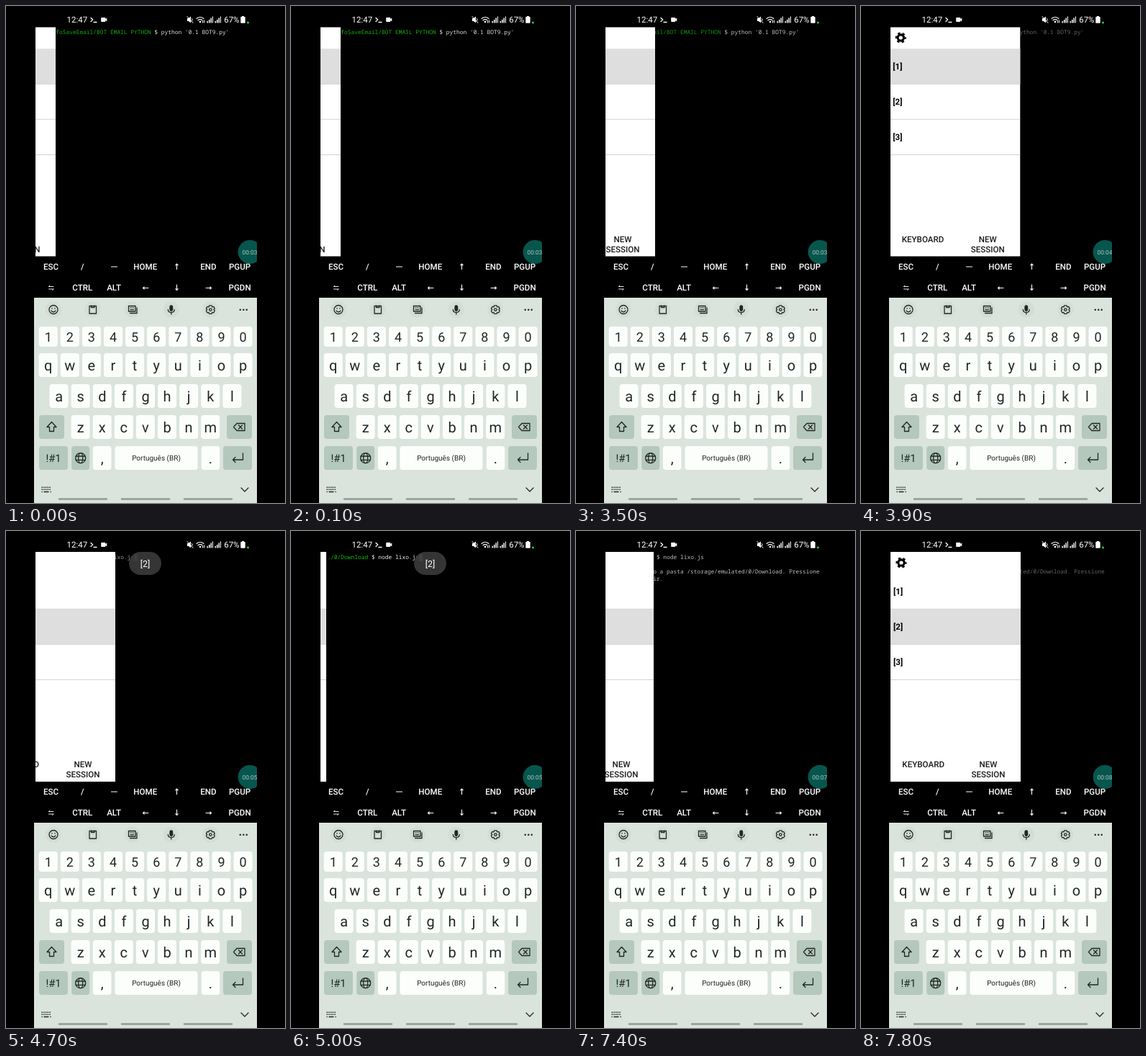
These frames come from a looping animation (388x690 px, 8 s). An HTML page:

```html
<!DOCTYPE html>
<html lang="pt-BR">
<head>
<meta charset="utf-8">
<title>Terminal sessions</title>
<style>
html, body { margin: 0; width: 100%; height: 100%; overflow: hidden; background: #000; }
svg { display: block; width: 388px; height: 690px; font-family: Roboto, sans-serif; text-rendering: geometricPrecision; }
.mid { text-anchor: middle; }
.mono { font: 7.88px "Noto Sans Mono", "DejaVu Sans Mono", monospace; fill: #f4f4f4; }
.dir { fill: #12c312; }
.line { fill: none; stroke: currentColor; stroke-width: 1.3; stroke-linecap: round; stroke-linejoin: round; }
.white { color: #fff; fill: #fff; }
.ink { color: #202724; }

/* One clock for every part; the small lead keeps steps ahead of rounding. */
.anim { animation: 8s step-end -10ms infinite; }
#term { animation-name: slide; }
#drawer { transform: translateX(calc(var(--x) * 1px)); }
#scrim { opacity: calc((181 + var(--x)) / 181 * .6); }
#first { animation-name: first; }
#second { animation-name: second; }
#output { animation-name: output; }
#cursor { animation-name: cursor; }
#current { animation-name: current; }
#toast { animation-name: toast; }
#enter { animation-name: press; }
#timer { animation-name: tick; }

@keyframes slide {
  0% { --x: -153; }
  43.75% { --x: -112; } 45% { --x: -66; } 46.25% { --x: -31; } 47.5% { --x: -9; }
  48.75% { --x: -.7; } 51.25% { --x: 0; }
  57.5% { --x: -23; } 58.75% { --x: -70; } 60% { --x: -119; } 61.25% { --x: -153; }
  62.5% { --x: -173; } 63.75% { --x: -180; } 65% { --x: -181; }
  92.5% { --x: -114; } 93.75% { --x: -66; } 95% { --x: -31; } 96.25% { --x: -9; }
  97.5%, 100% { --x: 0; }
}
@keyframes first { 0% { visibility: visible; } 56.25%, 100% { visibility: hidden; } }
@keyframes second { 0% { visibility: hidden; } 56.25%, 100% { visibility: visible; } }
@keyframes output { 0% { opacity: 0; } 77.5%, 100% { opacity: 1; } }
@keyframes cursor {
  0% { transform: translate(137.3px, -10px); }
  75% { transform: none; }
  77.5%, 100% { transform: translateY(30px); }
}
@keyframes current { 0% { transform: none; } 56.25%, 100% { transform: translateY(49px); } }
@keyframes toast { 0% { opacity: 0; } 57.5% { opacity: .6; } 58.75% { opacity: 1; } 83.75%, 100% { opacity: 0; } }
@keyframes press { 0% { fill: #b5c8bd; } 75% { fill: #91ae9f; } 77.5%, 100% { fill: #b5c8bd; } }
@keyframes tick {
  0% { transform: none; }
  46.25% { transform: translateY(-40px); }
  57.5% { transform: translateY(-80px); }
  75% { transform: translateY(-120px); }
  92.5% { transform: translateY(-160px); }
  97.5%, 100% { transform: translateY(-200px); }
}
</style>
</head>
<body>
<svg viewBox="0 0 388 690">
  <defs>
    <clipPath id="view"><path d="M41 29.5H349V347.5H41Z"/></clipPath>
    <clipPath id="badge"><path d="M349 328.3A16.5 16.5 0 1 0 349 354.7Z"/></clipPath>
  </defs>
  <rect width="388" height="690"/>

  <!-- Status bar -->
  <g class="white" font-size="11.5">
    <text x="84.6" y="23">12:47</text>
    <path class="line" stroke-width="1.2" d="M118 16.5L120.7 19L118 21.5M122 22.5H126"/>
    <path d="M133 16H137.5Q138.3 16 138.3 16.8V18L140.3 16.5V21.5L138.3 20V21.2Q138.3 22 137.5 22H133Q132.200 22 132.200 21.200V16.800Q132.200 16 133 16Z"/>
    <path d="M252 17H254L257 14.500V23.500L254 21H252Z"/>
    <path class="line" style="stroke-width:1" d="M252 14.500L260 23.500M258.500 17.500Q260 19 258.800 20.500"/>
    <g class="line" style="stroke-width:1.2">
      <path d="M265 17.500Q270 13.500 275 17.500M267 19.800Q270 17.300 273 19.800"/>
    </g>
    <circle cx="270" cy="22" r="1.300"/>
    <path d="M273 20.500H274V23.500H273ZM275 19.500H276V23.500H275Z"/>
    <path id="bars" d="M279.500 21H281V23.500H279.500ZM282 19H283.500V23.500H282ZM284.500 16.500H286V23.500H284.500ZM287 14.500H288V23.500H287Z"/>
    <use href="#bars" x="11"/>
    <text x="303.200" y="23">67%</text>
    <path d="M328 14H331V15H332Q332.700 15 332.700 15.700V23Q332.700 23.700 332 23.700H327Q326.300 23.700 326.300 23V15.700Q326.300 15 327 15H328Z"/>
    <circle cx="336.500" cy="23" r="1.500" fill="#16d84a"/>
  </g>

  <!-- Terminal and drawer -->
  <g id="term" class="anim" clip-path="url(#view)">
    <g id="first" class="anim mono">
      <text x="41" y="38.800"><tspan class="dir">.../InfoSaveEmail/BOT EMAIL PYTHON</tspan> $ python '0.1 BOT9.py'</text>
      <rect x="41" y="42" width="4.700" height="10"/>
    </g>
    <g id="second" class="anim mono">
      <text x="41" y="38.800"><tspan class="dir">.../0/Download</tspan> $ node lixo.js</text>
      <g id="output" class="anim">
        <text x="41" y="58.800">Bot monitorando a pasta /storage/emulated/0/Download. Pressione</text>
        <text x="41" y="68.800">Ctrl+C para sair.</text>
      </g>
      <rect id="cursor" class="anim" x="41" y="42" width="4.700" height="10"/>
    </g>
    <rect id="scrim" x="41" y="29" width="308" height="319"/>
    <g id="drawer" fill="#1c1c1c">
      <rect x="41" y="29" width="181" height="319" fill="#fff"/>
      <rect id="current" class="anim" x="41" y="59.300" width="181" height="49.200" fill="#dedede"/>
      <path d="M41 108.300H222M41 157.300H222M41 206.500H222" stroke="#d4d4d4"/>
      <g id="gear" fill="none" stroke="#000">
        <circle cx="56" cy="44" r="4.200" stroke-width="3.200"/>
        <circle cx="56" cy="44" r="6.300" stroke-width="2.600" stroke-dasharray="3.300 3.297" stroke-dashoffset="1.650"/>
      </g>
      <g id="rows" font-size="11.600" font-weight="700" fill="#000"></g>
      <g class="mid" font-size="11.600" font-weight="500">
        <text x="86.700" y="328">KEYBOARD</text>
        <text x="177" y="328">NEW</text>
        <text x="177" y="342">SESSION</text>
      </g>
    </g>
  </g>

  <g id="toast" class="anim">
    <rect x="171" y="29" width="45" height="32" rx="16" fill="#393939" fill-opacity=".94"/>
    <text class="mid" x="193.500" y="49.500" font-size="12.500" fill="#fff">[2]</text>
  </g>

  <g clip-path="url(#badge)">
    <rect x="320" y="324" width="29" height="36" fill="#07564e"/>
    <g id="timer" class="anim mid" font-size="8.400" fill="#adc3c0"></g>
  </g>

  <!-- Extra keys -->
  <g id="extra" class="white mid" font-size="11.600" font-weight="500"></g>
  <g class="white line" style="fill:none;stroke-width:1.100">
    <path d="M146.500 362H154.500M237.500 365.500V358M235.800 359.800L237.500 358L239.200 359.800"/>
    <path d="M237.500 387V394.500M235.800 392.700L237.500 394.500L239.200 392.700"/>
    <path d="M198 391.500H190.500M192.300 389.800L190.500 391.500L192.300 393.200"/>
    <path d="M278 391.500H285.500M283.700 389.800L285.500 391.500L283.700 393.200"/>
    <path d="M66 389.500H59.500M61 388L59.500 389.500M59.500 393H66M64.500 394.500L66 393" stroke-width=".9"/>
  </g>

  <!-- Keyboard -->
  <rect x="39" y="405" width="310" height="285" fill="#dae4dd"/>
  <g id="dots" fill="#d3ddd6"></g>
  <g id="keys" class="mid" fill="#202724"></g>
  <rect id="enter" class="anim" x="302" y="611" width="40" height="33" rx="4"/>
  <g class="ink line">
    <circle cx="66" cy="421.500" r="6"/>
    <path d="M63 423Q66 426.500 69 423M64 419.500V420M68 419.500V420"/>
    <path d="M116 416.500H125.500V427H116ZM118.500 416V418.500H123V416"/>
    <path d="M170.500 416.500H180V424H170.500ZM172.500 426.500H182V419M173 419H173.200M175.200 419H175.400M177.400 419H177.600M173 421.700H177.600"/>
    <path d="M225.300 421.500Q225.500 425.500 229.800 425.500Q234 425.500 234.200 421.500M229.800 425.500V428"/>
    <rect x="228" y="415.800" width="3.600" height="7.500" rx="1.800" fill="currentColor"/>
    <path d="M282.700 415.800H286L286.700 417.800L288.800 417.400L290.300 420L289 421.500L290.300 423.200L288.800 425.800L286.700 425.400L286 427.400H282.700L282 425.400L279.900 425.800L278.400 423.200L279.700 421.500L278.400 420L279.900 417.400L282 417.800Z"/>
    <circle cx="284.350" cy="421.600" r="1.800"/>
    <path stroke-width="2.400" style="stroke-width:2.400" d="M325.700 421.800H325.800M330.200 421.800H330.300M334.700 421.800H334.800"/>
    <path d="M63.500 577.500L70 584.500H66.500V590.500H60.500V584.500H57Z"/>
    <path d="M321 579.500H332V589.500H321L316.500 584.500ZM323.500 582L328.500 587M328.500 582L323.500 587"/>
    <circle cx="103.700" cy="627.700" r="7"/>
    <ellipse cx="103.700" cy="627.700" rx="3" ry="7"/>
    <path d="M97.300 625H110.100M97.300 630.400H110.100"/>
    <path d="M329.500 621V630H315.500M319 626.500L315.500 630L319 633.500"/>
    <path d="M327 669L332 674L337 669"/>
    <path style="stroke-width:1.500;stroke-linecap:butt;stroke-dasharray:1.500 1.200" d="M49.500 668.200H62.500M49.500 671.200H62.500"/>
    <path style="stroke-width:1.300" d="M50 674.500H50.300M53 674.500H59M62 674.500H62.300"/>
  </g>
  <path d="M74 684.500H140M161 684.500H227M248 684.500H314" stroke="#929b96" stroke-width="2.600" stroke-linecap="round"/>
</svg>
<script>
const add = (id, tag, attrs, label = '') => {
  const el = document.createElementNS('http://www.w3.org/2000/svg', tag);
  for (const name in attrs) el.setAttribute(name, attrs[name]);
  el.textContent = label;
  document.getElementById(id).append(el);
};

const key = (cx, cy, w, h, label = '', size = 20, drop = 7, fill = '#fcfefc') => {
  add('keys', 'rect', { x: cx - w / 2, y: cy - h / 2, width: w, height: h, rx: 4, fill });
  if (label) add('keys', 'text', { x: cx, y: cy + drop, 'font-size': size }, label);
};

const keyRow = (chars, x, y, h = 33, size = 20, drop = 7) =>
  [...chars].forEach((c, i) => key(x + i * 30.1, y, 26, h, c, size, drop));

keyRow('1234567890', 58.7, 459, 28, 18, 6.7);
keyRow('qwertyuiop', 58.7, 498.5);
keyRow('asdfghjkl', 73.6, 541.5);
keyRow('zxcvbnm', 103.6, 584.5);

const shade = '#b5c8bd';
key(63.5, 584.5, 35, 33, '', 0, 0, shade);
key(324.5, 584.5, 35, 33, '', 0, 0, shade);
key(66, 627.5, 40, 33, '!#1', 14.8, 5.3, shade);
key(103.7, 627.5, 25, 33, '', 0, 0, shade);
key(133.7, 627.5, 25.5, 33, ',');
key(209, 627.5, 115, 33, 'Português (BR)', 10, 3.8);
key(284.5, 627.5, 25.5, 33, '.');

[66, 120.5, 175.5, 229.7, 284.3].forEach(cx => add('dots', 'circle', { cx, cy: 421.5, r: 11 }));

['ESC,/,,HOME,,END,PGUP', ',CTRL,ALT,,,,PGDN'].forEach((row, r) =>
  row.split(',').forEach((label, i) =>
    label && add('extra', 'text', { x: 62.6 + i * 43.75, y: 365.7 + r * 29 }, label)));

[1, 2, 3].forEach(n => add('rows', 'text', { x: 45, y: 39 + n * 49.1 }, `[${n}]`));

for (let i = 0; i < 6; i++) add('timer', 'text', { x: 339, y: 344.7 + i * 40 }, `00:0${3 + i}`);
</script>
</body>
</html>
```
